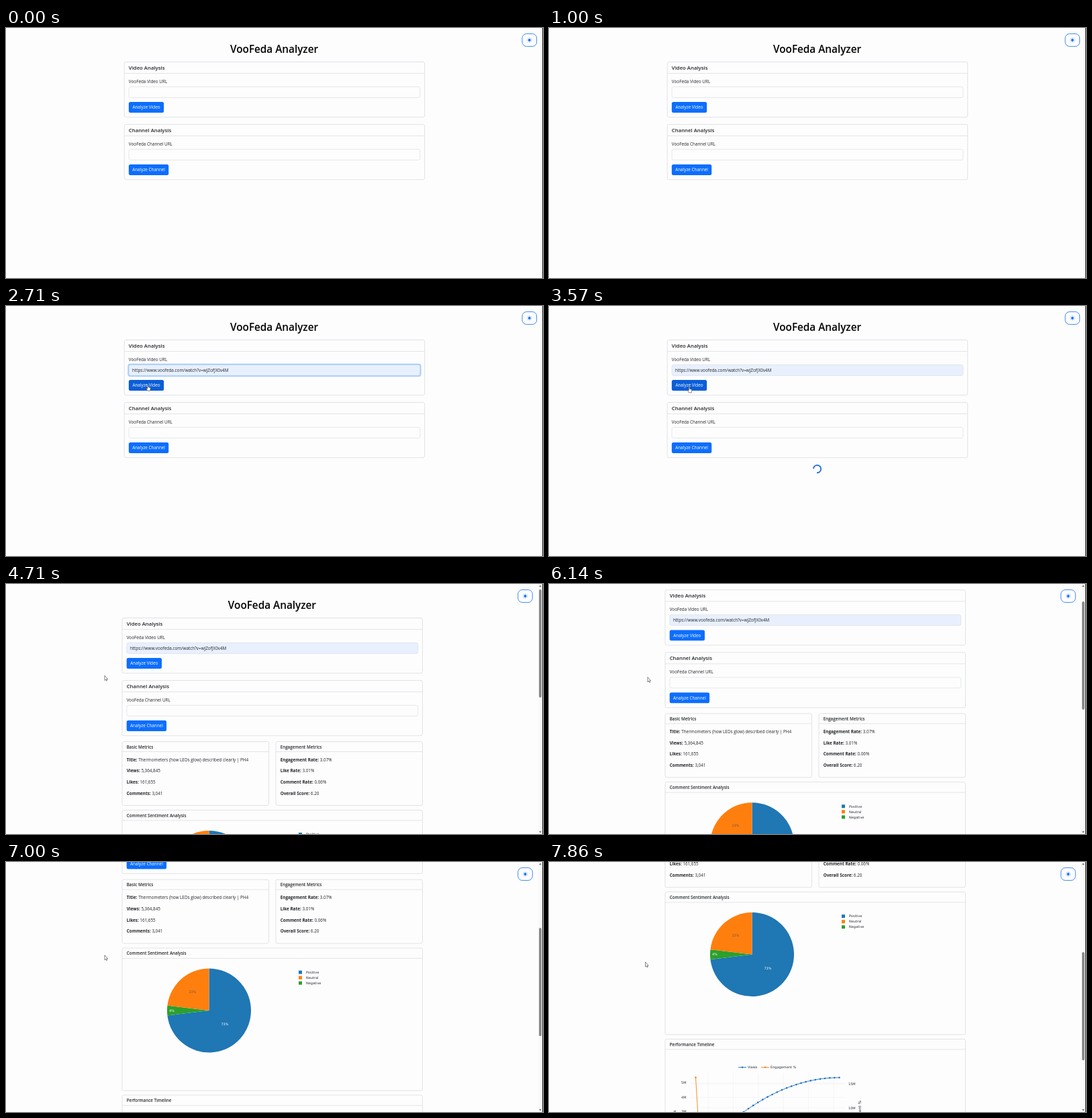
These frames come from a looping animation (800 px wide and 372 px high, 8 s). An HTML page:

```html
<!DOCTYPE html>
<html lang="en">
<head>
<meta charset="utf-8">
<title>Video analyzer</title>
<style>
  html, body { margin: 0; width: 100%; height: 100%; overflow: hidden; background: #fefdfe; }
  svg { display: block; width: 800px; height: 372px; }
  text { font: 6.35px "Open Sans", "Noto Sans", sans-serif; fill: #212529; }
  .h1 { font-size: 15.3px; font-weight: 600; fill: #000; text-anchor: middle; }
  .h5 { font-size: 7.75px; font-weight: 600; }
  .h6 { font-size: 6.25px; font-weight: 600; }
  .b { font-weight: 700; }
  .btn { fill: #fff; text-anchor: middle; }
  .plot text { font: 5px "DejaVu Sans", Verdana, sans-serif; fill: #2a3038; }
  .plot .axis { font-size: 5.8px; text-anchor: middle; }
  .plot .mid { text-anchor: middle; }
  .plot .end { text-anchor: end; }
  .plot .light { fill: #fff; }
  .plot .dim { fill: #6b5a4a; }
</style>
</head>
<body>
<svg id="stage" viewBox="0 0 800 372"></svg>
<script>
const BLUE = '#0d6efd', LINE = '#1f75c4', ORANGE = '#ff7f0e';
const FRAME = 1000 / 7, LOOP = 56;

const text = (x, y, s, cls = '', more = '') => `<text x="${x}" y="${y}" class="${cls}" ${more}>${s}</text>`;
const rect = (x, y, w, h, fill, more = '') => `<rect x="${x}" y="${y}" width="${w}" height="${h}" fill="${fill}" ${more}/>`;
const path = (d, stroke, more = '') => `<path d="${d}" fill="none" stroke="${stroke}" ${more}/>`;

function card(x, y, w, h, head, title, cls, base) {
  return rect(x, y, w, h, '#fefdfe', 'rx="2.5" stroke="#d9dcdf" stroke-width=".8"') +
    path(`M${x} ${y + head}h${w}`, '#dcdfe2', 'stroke-width=".8"') +
    text(x + 6.7, y + base, title, cls);
}

function form(y, kind, width, id) {
  return card(173, y, 447.5, 82.2, 17, kind + ' Analysis', 'h5', 11.6) +
    text(179.7, y + 31, `VooFeda ${kind} URL`) +
    rect(179.9, y + 37, 433.7, 16, '#fefdfe', `id="${id}In" rx="2.5" stroke="#dee2e6" stroke-width=".8"`) +
    rect(179.7, y + 59.6, width, 15.8, BLUE, `id="${id}Btn" rx="2.5"`) +
    text(179.7 + width / 2, y + 69.9, 'Analyze ' + kind, 'btn');
}

function metrics(x, title, rows) {
  return card(x, 234.5, 218.5, 95, 15, title, 'h6', 10) + rows.map(([k, v], i) =>
    text(x + 6.7, 263.7 + i * 16.65, `<tspan class="b">${k}:</tspan> ${v}`)).join('');
}

function slice(from, to, fill) {
  const at = p => `${302.5 + 62.5 * Math.sin(p * 2 * Math.PI)} ${429.4 - 62.5 * Math.cos(p * 2 * Math.PI)}`;
  return `<path d="M302.5 429.4L${at(from)}A62.5 62.5 0 ${+(to - from > .5)} 1 ${at(to)}Z" fill="${fill}"/>`;
}

function pie() {
  const legend = [['Positive', '#1f77b4'], ['Neutral', ORANGE], ['Negative', '#2ca02c']];
  return slice(0, .731, '#1f77b4') + slice(.731, .769, '#2ca02c') + slice(.769, 1, ORANGE) +
    text(326, 451.5, '73%', 'mid light') + text(278, 403, '23%', 'mid dim') +
    text(247, 431.2, '4%', 'mid light') +
    legend.map(([name, fill], i) => rect(436, 370 + i * 8, 5, 5, fill) + text(447, 374.3 + i * 8, name)).join('');
}

function timeline() {
  const base = 728, dots = [];
  let grid = '', ticks = '';
  for (let x = 237; x < 440; x += 37.4) grid += `M${x} 606V740`;
  for (let m = 0; m < 6; m++) {
    const y = base - m * 21.5;
    grid += `M211 ${y}H440`;
    ticks += text(204.5, y + 1.8, m ? m + 'M' : 0, 'end');
  }
  for (let m = 0; m < 4; m++) {
    const y = base + .7 - m * 35.5;
    grid += `M211 ${y}H440`;
    ticks += text(446, y + 1.8, m ? m * 5 + 'M' : 0);
  }
  for (let i = 0; i <= 30; i++) {
    const u = i / 30;
    dots.push([218.5 + 214 * u, base - 115.4 * (1 - (1 - u) ** 2)]);
  }
  const dot = ([x, y], fill) => `<circle cx="${x}" cy="${y}" r="1.3" fill="${fill}"/>`;
  return path(grid, '#eeeff2', 'stroke-width=".6"') + ticks +
    path('M' + dots.join('L'), LINE, 'stroke-width=".9"') + dots.map(p => dot(p, LINE)).join('') +
    path(`M218.5 612.4L225.6 ${base - 1}H432.5`, ORANGE, 'stroke-width=".9"') + dot([218.5, 612.4], ORANGE) +
    path('M282 597.3h12', LINE, 'stroke-width=".9"') + dot([288, 597.3], LINE) + text(296, 599.1, 'Views') +
    path('M316 597.3h12', ORANGE, 'stroke-width=".9"') + dot([322, 597.3], ORANGE) + text(330, 599.1, 'Engagement %') +
    text(0, 0, 'Views', 'axis', 'transform="translate(189 669.5) rotate(-90)"') +
    text(0, 0, 'Engagement %', 'axis', 'transform="translate(465 669) rotate(-90)"');
}

const rays = [...Array(8)].map((_, i) =>
  `<path d="M2.6 0h.9" stroke="${BLUE}" stroke-width=".8" transform="rotate(${i * 45})"/>`).join('');

document.getElementById('stage').innerHTML = `
  <g id="page">
    ${text(396.4, 36.6, 'VooFeda Analyzer', 'h1')}
    ${form(50.5, 'Video', 52.3, 'video')}
    ${form(143.5, 'Channel', 59.4, 'channel')}
    ${rect(179.1, 86.7, 435.3, 17.6, 'none', 'id="ring" rx="3" stroke="#a9cdfd" stroke-width="2"')}
    ${rect(184.8, 91.8, .8, 8, '#333', 'id="caret"')}
    ${text(184.9, 97.9, 'https://www.voofeda.com/watch?v=wjZofJX0v4M', '', 'id="url"')}
    ${path('M4 -4A5.66 5.66 0 1 0 4 4', '#1569dc', 'id="spin" stroke-width="1.8"')}
    <g id="results">
      ${metrics(173, 'Basic Metrics', [['Title', 'Thermometers (how LEDs glow) described clearly | PH4'],
        ['Views', '5,364,845'], ['Likes', '161,655'], ['Comments', '3,041']])}
      ${metrics(402, 'Engagement Metrics', [['Engagement Rate', '3.07%'], ['Like Rate', '3.01%'],
        ['Comment Rate', '0.06%'], ['Overall Score', '6.20']])}
      ${card(173, 336.4, 447.5, 212.2, 15.4, 'Comment Sentiment Analysis', 'h6', 10.2)}
      ${card(173, 555.3, 447.5, 212.2, 15.4, 'Performance Timeline', 'h6', 10.2)}
      <g class="plot">${pie()}${timeline()}</g>
    </g>
  </g>
  <g id="toggle">
    ${rect(-10.8, -9.4, 21.6, 18.8, '#fefdfe', `rx="6.5" stroke="${BLUE}" stroke-width=".8"`)}
    <circle r="1.9" fill="${BLUE}"/>${rays}
  </g>
  <g id="bar">
    ${rect(792.5, 0, 6.3, 372, '#fafafa')}
    <path d="M793.9 4.2l2-2.6 2 2.6zM793.9 367.8l2 2.6 2-2.6z" fill="#777"/>
    ${rect(794, 8, 3.9, 161, '#8b8b8b', 'id="thumb" rx="1.9"')}
  </g>
  ${rect(799, 0, 1, 372, '#222')}
  <path id="arrow" d="M0 0V7.2L1.6 5.8 2.7 8 3.7 7.5 2.7 5.3H4.6Z" fill="#fff" stroke="#333" stroke-width=".6"/>
  <path id="hand" d="M-.8 .5Q0 -.6 .7 .5V3.1L3 3.6Q3.9 3.9 3.8 5L3.2 8.6H-.6L-2.6 5.4Q-2.4 4.3 -.8 5.5Z" fill="#fff" stroke="#333" stroke-width=".6"/>`;

const $ = id => document.getElementById(id);
const show = (id, on) => $(id).style.display = on ? '' : 'none';
const move = (id, x, y, more = '') => $(id).setAttribute('transform', `translate(${x} ${y}) ${more}`);

// Linear interpolation through [step, value] keys
function track(n, keys) {
  const i = keys.findIndex(k => k[0] > n);
  if (i < 0) return keys[keys.length - 1][1];
  if (i === 0) return keys[0][1];
  const [a, u] = keys[i - 1], [b, v] = keys[i];
  return u + (v - u) * (n - a) / (b - a);
}

function draw(ms) {
  const n = Math.floor((ms + 5) / FRAME) % LOOP;
  const done = n >= 30, filled = n >= 15, hover = n >= 18 && n < 27;
  const scroll = track(n, [[41, 0], [43, 41.7], [44, 41.7], [49, 208.4], [51, 208.4], [55, 291.8]]);

  move('page', done ? 0 : 3.15, -scroll);
  move('toggle', done ? 773.5 : 779.8, 18);
  move('spin', 396.4, 242.5, `rotate(${140 + (n - 25) * FRAME * .48})`);
  $('thumb').setAttribute('y', 8 + scroll * .432);
  $('videoIn').setAttribute('fill', filled ? '#e8f0fe' : '#fefdfe');
  $('videoBtn').setAttribute('fill', hover ? '#0b5ed7' : BLUE);

  show('ring', n >= 9 && n < 22);
  show('caret', n >= 9 && !filled);
  show('url', filled);
  show('spin', n >= 22 && !done);
  show('results', done);
  show('bar', done);
  show('hand', hover);
  show('arrow', n >= 27);

  move('hand', track(n, [[18, 214], [20, 209], [25, 209], [26, 203]]), track(n, [[18, 115], [20, 120.3], [25, 120.3], [26, 122]]));
  move('arrow', track(n, [[26, 203], [29, 147], [51, 147], [55, 143.6]]),
    track(n, [[26, 122], [29, 136.2], [36, 136.2], [40, 138.6], [51, 138.6], [55, 148.8]]));
}

const start = performance.now();
function tick() {
  draw(performance.now() - start);
  requestAnimationFrame(tick);
}
tick();
</script>
</body>
</html>
```
